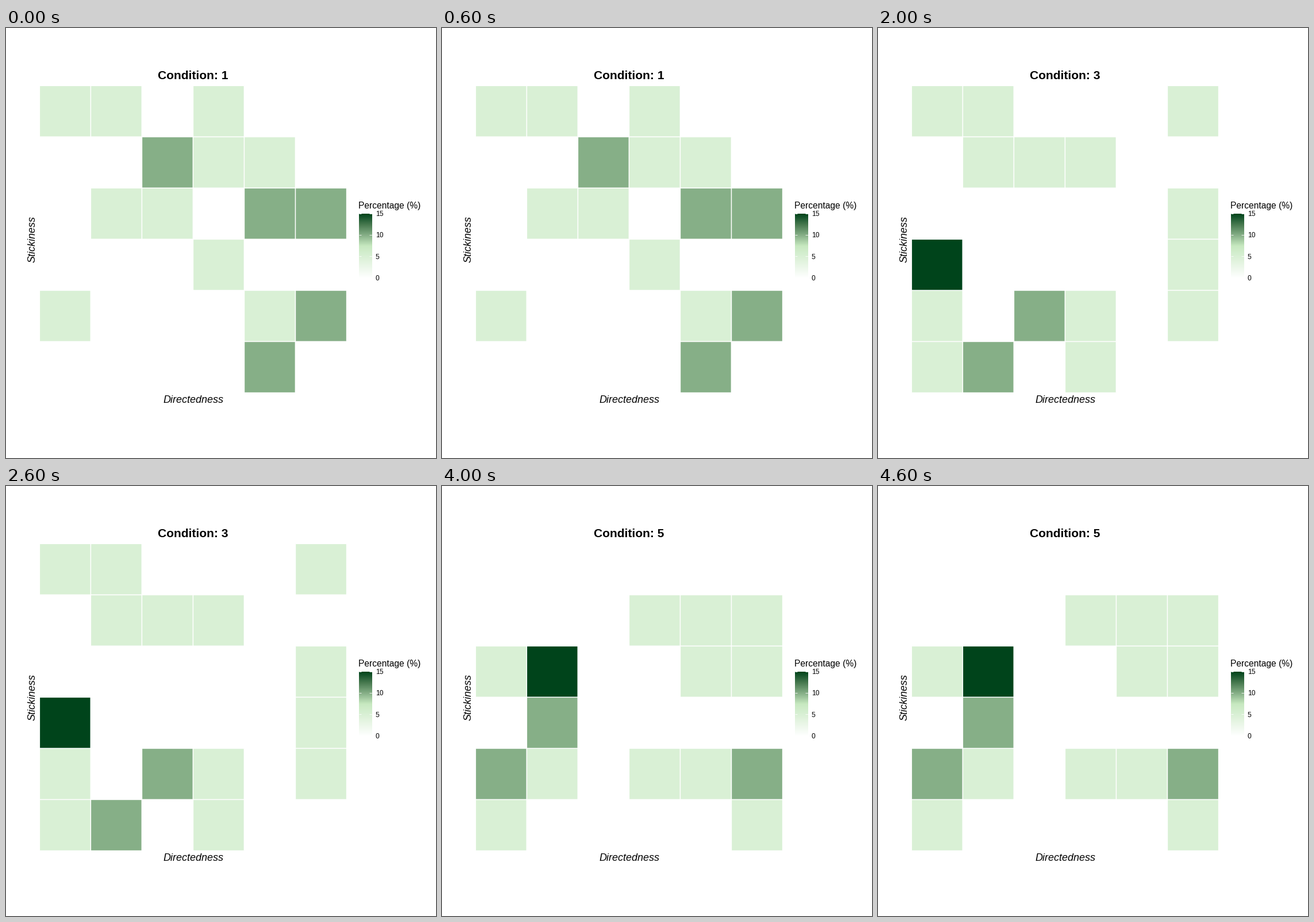
A matplotlib script that plays this animation: 748 px wide and 748 px high, repeating every 5000 ms.

```python
import matplotlib.pyplot as plt
import numpy as np
from matplotlib.animation import FuncAnimation
from matplotlib.colors import LinearSegmentedColormap
from matplotlib.patches import Rectangle

SIZE, DPI = 748, 64
PX = 72 / DPI
LEFT, TOP, CELL = 58.4, 100.4, 89.02

# One digit per tile, in steps of 5 percent.
CONDITIONS = [
    "110100 002110 011022 000100 100012 000020",
    "013000 300003 101001 100000 011011 020000",
    "110001 011100 000001 300001 102101 120100",
    "101010 100200 110010 100100 010102 201101",
    "000000 000111 130011 020000 210112 100001",
]

plt.rcParams["font.family"] = "Liberation Sans"
greens = LinearSegmentedColormap.from_list("greens", [
    (0, "#ffffff"), (1 / 3, "#d9f0d5"), (1 / 2, "#c7e9c0"),
    (2 / 3, "#86af87"), (5 / 6, "#47794f"), (1, "#00441b")])

fig = plt.figure(figsize=(SIZE / DPI, SIZE / DPI), dpi=DPI, facecolor="white")
ax = fig.add_axes([0, 0, 1, 1])
ax.axis("off")


def label(x, y, text, size, **style):
    style = {"va": "baseline", "color": "black", **style}
    return ax.text(x, y, text, fontsize=size * PX, **style)


def draw_legend(x0=613.6, x1=636.6, y0=322.8, y1=434.6):
    label(613.3, 313.7, "Percentage (%)", 15.6)
    ramp = np.linspace(1, 0, 300)[:, None]
    ax.imshow(ramp, cmap=greens, vmin=0, vmax=1, aspect="auto",
              extent=(x0, x1, y1, y0), interpolation="bilinear")
    tick = (x1 - x0) / 5
    for value in (0, 5, 10, 15):
        y = y1 + (y0 - y1) * value / 15
        for a, b in ((x0, x0 + tick), (x1 - tick, x1)):
            ax.plot([a, b], [y, y], color="white", lw=0.8 * PX,
                    solid_capstyle="butt")
        label(643, y + 4.3, str(value), 12)


title = label(325.3, 88.7, "", 21, ha="center", weight="bold")
label(326, 651.8, "Directedness", 18, ha="center", style="italic")
label(50.7, 367, "Stickiness", 18, ha="center", style="italic",
      rotation=90, rotation_mode="anchor")
draw_legend()

tiles = [Rectangle((LEFT + c * CELL, TOP + r * CELL), CELL, CELL,
                   ec="white", lw=1.4 * PX, snap=False)
         for r in range(6) for c in range(6)]
for tile in tiles:
    ax.add_patch(tile)

ax.set_xlim(0, SIZE)
ax.set_ylim(SIZE, 0)


def update(i):
    title.set_text(f"Condition: {i + 1}")
    for tile, level in zip(tiles, CONDITIONS[i].replace(" ", "")):
        tile.set_facecolor(greens(int(level) / 3))
    return [title, *tiles]


anim = FuncAnimation(fig, update, frames=len(CONDITIONS), interval=1000,
                     repeat=True, repeat_delay=0)
plt.show()
```
